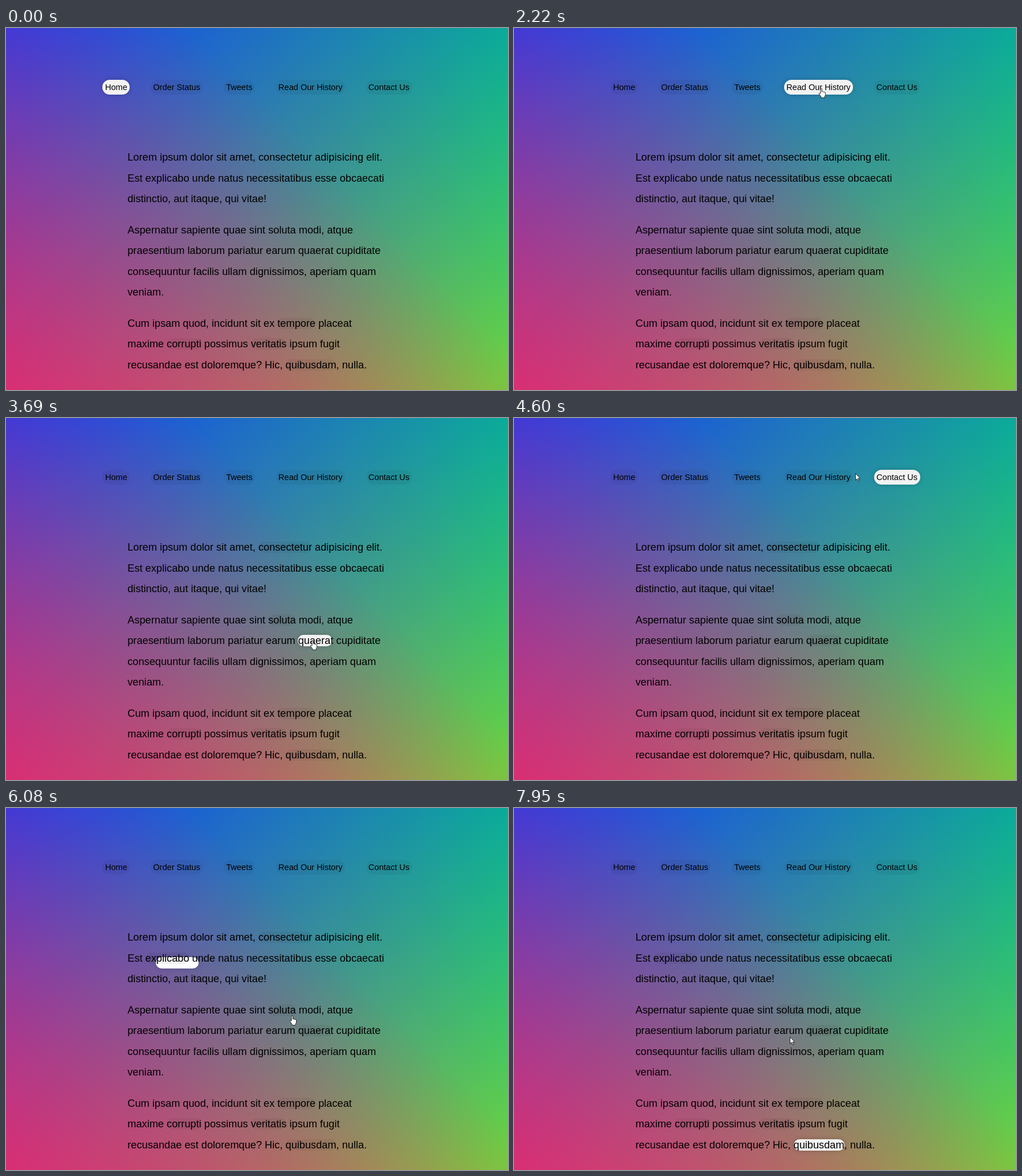
Animation, 881 px wide and 636 px high, one loop 8 s. Source, as an HTML page:

```html
<!DOCTYPE html>
<html lang="en">
<head>
<meta charset="utf-8">
<title>Follow-along links</title>
<style>
  * { box-sizing: border-box; }
  html {
    height: 100%;
    overflow: hidden;
    background:
      linear-gradient(45deg, hsla(340, 100%, 55%, 1) 0%, hsla(340, 100%, 55%, 0) 70%),
      linear-gradient(135deg, hsla(225, 95%, 50%, 1) 0%, hsla(225, 95%, 50%, 0) 80%),
      linear-gradient(225deg, hsla(140, 90%, 50%, 1) 0%, hsla(140, 90%, 50%, 0) 80%),
      hsl(35, 95%, 55%);
    background-size: 881px 980px;
  }
  body {
    height: 100%;
    margin: 0;
    padding: 91.4px 0 0 1px;
    overflow: hidden;
    font: 14.57px/17px "Liberation Sans", Arial, sans-serif;
    color: #000;
  }
  .menu {
    display: flex;
    justify-content: center;
    list-style: none;
    margin: 0 0 92px;
    padding: 0;
  }
  .menu a {
    display: inline-block;
    padding: 4.55px;
    margin: 0 18.22px;
  }
  .wrapper {
    width: 455.5px;
    margin: 0 auto;
    font-size: 18.22px;
    line-height: 36.44px;
    white-space: nowrap;
  }
  p { margin: 0 0 18.22px; }
  a {
    color: #000;
    border-radius: 18.22px;
    background: rgba(0, 0, 0, .05);
  }
  .highlight {
    position: absolute;
    z-index: -1;
    border-radius: 18.22px;
    background: #fff;
    box-shadow: 0 0 9px rgba(0, 0, 0, .2);
  }
  .cursor { position: absolute; left: 0; top: 0; }
  .cursor svg {
    position: absolute;
    overflow: visible;
    fill: #fff;
    stroke: #111;
    stroke-width: .9;
    stroke-linejoin: round;
  }
  .hand { left: -5px; }
</style>
</head>
<body>
<ul class="menu">
  <li><a id="home">Home</a></li>
  <li><a id="order">Order Status</a></li>
  <li><a id="tweets">Tweets</a></li>
  <li><a id="history">Read Our History</a></li>
  <li><a id="contact">Contact Us</a></li>
</ul>
<div class="wrapper">
  <p>Lorem ipsum dolor sit amet, <a id="consectetur">consectetur</a> adipisicing elit.<br>
  Est <a id="explicabo">explicabo</a> unde natus necessitatibus esse obcaecati<br>
  distinctio, aut itaque, qui vitae!</p>
  <p>Aspernatur sapiente quae sint <a id="soluta">soluta</a> modi, atque<br>
  praesentium laborum pariatur earum <a id="quaerat">quaerat</a> cupiditate<br>
  consequuntur facilis ullam dignissimos, aperiam quam<br>
  veniam.</p>
  <p>Cum ipsam quod, incidunt sit ex <a id="tempore">tempore</a> placeat<br>
  maxime <a>corrupti</a> possimus <a>veritatis</a> ipsum fugit<br>
  recusandae est doloremque? Hic, <a id="quibusdam">quibusdam</a>, nulla.</p>
</div>
<span class="highlight"></span>
<div class="cursor">
  <svg class="arrow" width="9" height="15"><path d="M.5.5V12.2L3.2 9.7 5.1 14.2 6.9 13.4 5 9.1H8.6Z"/></svg>
  <svg class="hand" width="13" height="18"><path d="M4 10V2.2a1.2 1.2 0 0 1 2.4 0V7l1.2-.6 1 .9 1.2-.4.9 1 1.2-.2.6 1v4L11 16.2v1.3H5V16L1.4 10.8C.8 9.8 1.9 8.8 2.8 9.5Z"/></svg>
</div>
<script>
  const LOOP = 8000, MOVE = 200;
  const NONE = 0, ARROW = 1, HAND = 2;
  const find = selector => document.querySelector(selector);

  // Time each link is entered.
  const visits = [
    [0, 'home'], [1160, 'order'], [1570, 'tweets'], [1920, 'history'],
    [2500, 'consectetur'], [2930, 'soluta'], [3530, 'quaerat'], [4240, 'contact'],
    [4640, 'history'], [4860, 'tweets'], [5060, 'order'], [5260, 'explicabo'],
    [6062, 'soluta'], [7250, 'tempore'], [7460, 'quibusdam']
  ];

  // Time, hot spot and shape of the pointer.
  const pointer = [
    [0, 870, 618, NONE], [130, 870, 618, ARROW], [210, 870, 618, NONE],
    [360, 855, 318, ARROW], [700, 530, 212, ARROW], [1000, 272, 136, ARROW],
    [1120, 238, 119, ARROW], [1160, 256, 112, HAND], [1370, 320, 102, HAND],
    [1440, 346, 103, ARROW], [1570, 384, 105, HAND], [1780, 438, 106, ARROW],
    [1920, 475, 106, HAND], [2220, 539, 105, HAND], [2330, 538, 118, ARROW],
    [2500, 522, 218, HAND], [2660, 514, 239, ARROW], [2930, 497, 346, HAND],
    [3300, 492, 366, ARROW], [3530, 516, 386, HAND], [3690, 538, 390, HAND],
    [3790, 546, 379, ARROW], [4120, 657, 137, ARROW], [4240, 657, 116, HAND],
    [4500, 631, 101, ARROW], [4600, 599, 97, ARROW], [4640, 594, 99, HAND],
    [4820, 473, 102, ARROW], [4860, 436, 103, HAND], [4970, 381, 103, ARROW],
    [5060, 344, 104, HAND], [5150, 312, 118, ARROW], [5260, 290, 254, HAND],
    [5420, 286, 262, HAND], [5620, 292, 276, ARROW], [5780, 306, 372, ARROW],
    [6062, 465, 362, HAND], [6080, 502, 364, HAND], [6250, 497, 356, HAND],
    [6480, 496, 354, HAND], [6550, 495, 353, HAND], [6860, 495, 353, HAND],
    [6930, 499, 366, ARROW], [7250, 530, 510, HAND], [7340, 534, 530, ARROW],
    [7460, 540, 582, HAND], [7640, 550, 598, HAND], [7720, 550, 598, HAND],
    [7820, 532, 550, ARROW], [7950, 484, 402, ARROW]
  ];

  function play(element, frames) {
    const last = { ...frames[frames.length - 1], offset: 1 };
    element.animate([...frames, last], { duration: LOOP, iterations: Infinity });
  }

  function box(id) {
    const { left, top, width, height } = find('#' + id).getBoundingClientRect();
    return { left: left + 'px', top: top + 'px', width: width + 'px', height: height + 'px' };
  }

  play(find('.highlight'), visits.flatMap(([time, id], i) => {
    if (!i) return [{ offset: 0, ...box(id) }];
    return [
      { offset: time / LOOP, ...box(visits[i - 1][1]), easing: 'ease' },
      { offset: (time + MOVE) / LOOP, ...box(id) }
    ];
  }));

  play(find('.cursor'), pointer.map(([time, x, y, shape]) => ({
    offset: time / LOOP,
    transform: `translate(${x}px, ${y}px)`,
    easing: shape === NONE ? 'steps(1)' : 'linear'
  })));

  for (const [selector, kind] of [['.arrow', ARROW], ['.hand', HAND]]) {
    play(find(selector), pointer.map(([time, , , shape]) => ({
      offset: time / LOOP,
      opacity: shape === kind ? 1 : 0,
      easing: 'steps(1)'
    })));
  }

  // These links only show their tint once they have been visited.
  for (const id of ['consectetur', 'explicabo', 'soluta', 'quaerat']) {
    const [time] = visits.find(visit => visit[1] === id);
    play(find('#' + id), [
      { offset: 0, backgroundColor: 'rgba(0, 0, 0, 0)', easing: 'steps(1)' },
      { offset: time / LOOP, backgroundColor: 'rgba(0, 0, 0, .05)' }
    ]);
  }
</script>
</body>
</html>
```
